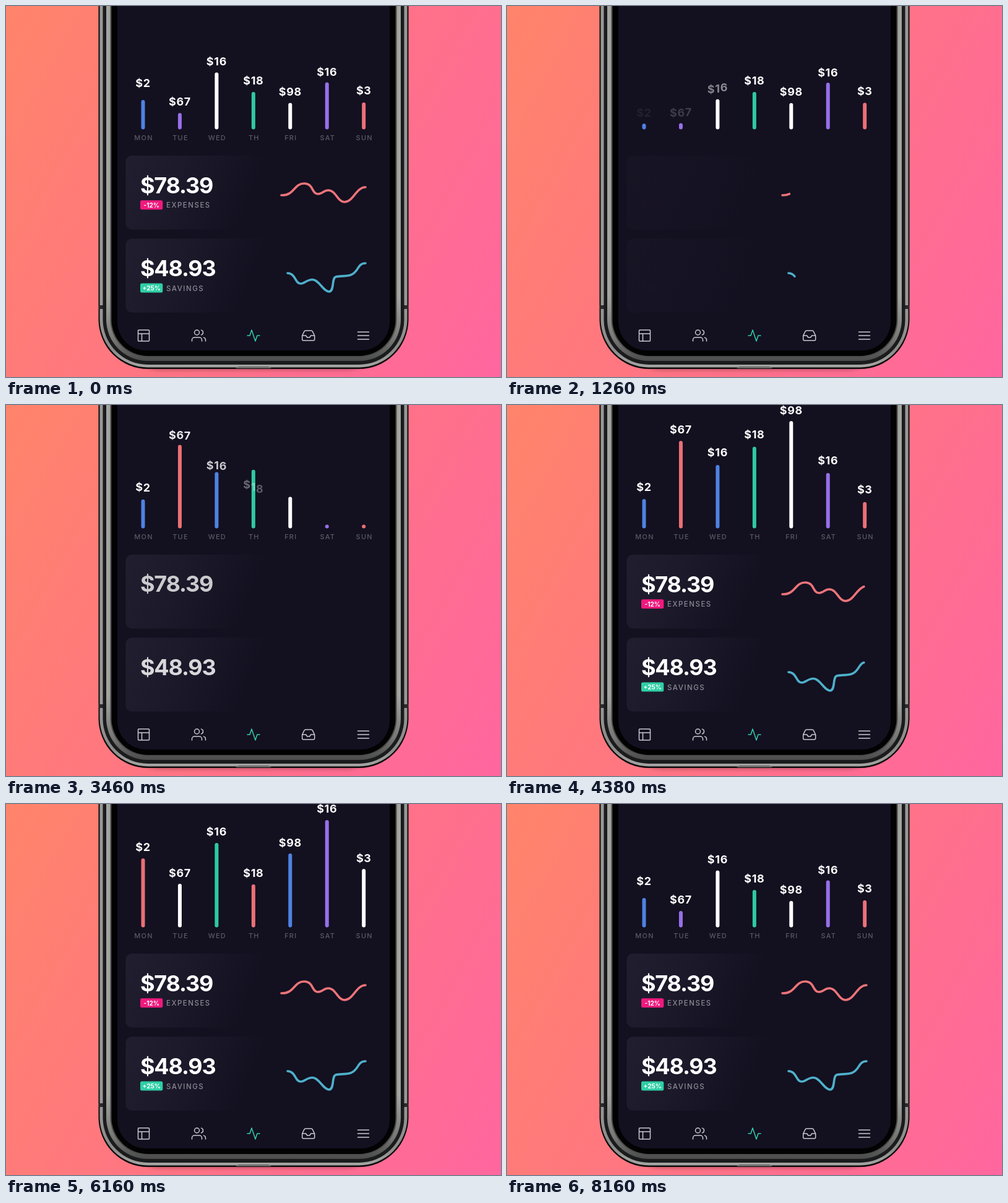
Animation of 800 by 600 pixels, one loop 8180 ms. Source, as an HTML page:

```html
<!DOCTYPE html>
<html lang="en">
<head>
<meta charset="utf-8">
<title>Spending overview</title>
<style>
  html, body { margin: 0; width: 100%; height: 100%; overflow: hidden; }
  body { background: linear-gradient(118deg, #ff846a, #ff7288 58%, #ff669f); }
  svg { display: block; width: 100vw; height: 100vh; }
  text { font-family: Inter, "Open Sans", sans-serif; }
  .amount { font-size: 18px; font-weight: 700; letter-spacing: .6px; fill: #fff; text-anchor: middle; }
  .day { font-size: 11px; font-weight: 500; letter-spacing: 1.2px; fill: #5b5866; text-anchor: middle; }
  .total { font-size: 36px; font-weight: 700; letter-spacing: -1.2px; fill: #fff; }
  .badge { font-size: 10px; font-weight: 700; fill: #fff; text-anchor: middle; }
  .caption { font-size: 11.5px; font-weight: 500; letter-spacing: 1.5px; fill: #8b8994; }
  .bar { stroke-width: 6; stroke-linecap: round; }
  .trend { fill: none; stroke-width: 3.6; stroke-linecap: round; stroke-linejoin: round; }
  .icon { fill: none; stroke: #cbcad0; stroke-width: 1.5; stroke-linecap: round; stroke-linejoin: round; }
</style>
</head>
<body>
<svg id="stage" viewBox="0 0 800 600">
  <defs>
    <linearGradient id="rim" gradientUnits="userSpaceOnUse" x1="0" y1="480" x2="0" y2="586">
      <stop offset="0" stop-color="#989896"/><stop offset=".7" stop-color="#8a8a88"/><stop offset="1" stop-color="#a6a6a4"/>
    </linearGradient>
    <linearGradient id="bezel" gradientUnits="userSpaceOnUse" x1="0" y1="470" x2="0" y2="575">
      <stop offset="0" stop-color="#a3a3a0"/><stop offset=".65" stop-color="#777775"/><stop offset="1" stop-color="#4a4a4a"/>
    </linearGradient>
    <linearGradient id="card" x1="0" y1="0" x2="1" y2=".12">
      <stop offset="0" stop-color="#211e2f"/><stop offset=".25" stop-color="#1c192a"/><stop offset=".55" stop-color="#131020"/>
    </linearGradient>
    <filter id="soft" x="-10%" y="-10%" width="120%" height="120%"><feGaussianBlur stdDeviation="3"/></filter>
  </defs>

  <rect x="190" y="480" width="420" height="109" rx="60" opacity=".25" filter="url(#soft)"/>
  <rect x="149.5" y="-200" width="501" height="787" rx="80" fill="#0b0b0c"/>
  <rect x="151.5" y="-200" width="497" height="784.5" rx="78" fill="url(#rim)"/>
  <path d="M150 487h8M642 487h8" stroke="#2b2b2c" stroke-width="6"/>
  <path d="M371 586l5-3h48l5 3z" fill="#6d6d6c"/>
  <rect x="156.5" y="-200" width="487" height="780" rx="73" fill="#1a1b1c"/>
  <rect x="162" y="-200" width="476" height="774" rx="67" fill="url(#bezel)"/>
  <rect x="168.5" y="-200" width="463" height="768" rx="61" fill="#4b4b4b"/>
  <rect x="170.5" y="-200" width="459" height="766" rx="59" fill="#020203"/>
  <rect x="180" y="-200" width="440" height="757" rx="46" fill="#131020"/>

  <g id="cards"></g>
  <g id="chart"></g>

  <g class="icon">
    <path transform="translate(210.5 521)" d="M4 3h16a1 1 0 0 1 1 1v16a1 1 0 0 1-1 1H4a1 1 0 0 1-1-1V4a1 1 0 0 1 1-1zM3 9h18M9 21V9"/>
    <path transform="translate(299.5 521)" d="M17 21v-2a4 4 0 0 0-4-4H5a4 4 0 0 0-4 4v2M13 7a4 4 0 1 1-8 0a4 4 0 1 1 8 0M23 21v-2a4 4 0 0 0-3-3.87M16 3.13a4 4 0 0 1 0 7.75"/>
    <path transform="translate(388 521)" stroke="#2fcfaa" d="M22 12h-4l-3 9L9 3l-3 9H2"/>
    <path transform="translate(476.7 521)" d="M22 12h-6l-2 3h-4l-2-3H2M5.45 5.11L2 12v6a2 2 0 0 0 2 2h16a2 2 0 0 0 2-2v-6l-3.45-6.89A2 2 0 0 0 16.76 4H7.24a2 2 0 0 0-1.79 1.11z"/>
    <path transform="translate(565.5 521)" d="M3 12h18M3 6.3h18M3 18h18"/>
  </g>
</svg>
<script>
const LOOP = 8180, START = 2240, STAGGER = 105, BASE = 196.5;
const blue = [79, 130, 226], purple = [151, 112, 232], white = [255, 255, 255],
      green = [47, 201, 162], red = [235, 112, 118];

// Each look holds [bar top, amount centre, colour]: first, second and last arrangement.
const days = [
  { name: 'MON', amount: '$2',  looks: [[152, 132, blue],  [88, 69, red],     [152, 124.5, blue]] },
  { name: 'TUE', amount: '$67', looks: [[58, 39, red],     [129, 111, white], [173, 154.5, purple]] },
  { name: 'WED', amount: '$16', looks: [[97, 76.5, blue],  [63, 44, green],   [107.5, 89, white]] },
  { name: 'TH',  amount: '$18', looks: [[67.5, 47, green], [130, 111, red],   [139, 120, green]] },
  { name: 'FRI', amount: '$98', looks: [[26, 8, white],    [80, 62, blue],    [157, 138.5, white]] },
  { name: 'SAT', amount: '$16', looks: [[110, 89.5, purple], [26, 7.5, purple], [124, 107, purple]] },
  { name: 'SUN', amount: '$3',  looks: [[157, 136, red],   [105, 87.5, white], [156.5, 137.5, red]] }
];
const cards = [
  { y: 242, total: '$78.39', rate: '-12%', tint: '#f01a7e', caption: 'EXPENSES', stroke: '#ec7479', lead: 0,
    path: 'M445 306C466 307 465 287 482 287C497 287 494 304 504 304C511 304 513 298 521 298C533 298 536 317 547 317C561 317 566 293 581 293' },
  { y: 376.3, total: '$48.93', rate: '+25%', tint: '#2fcfa5', caption: 'SAVINGS', stroke: '#4fb0ca', lead: 35,
    path: 'M455 432C468 432 467 449 476 449C483 449 486 442.500 495 442.500C506 442.500 513 462 522 462C531 462 526 440 533 438C540 436 548 438 557 435C571 430 567 416 581 416' }
];

function add(parent, tag, attrs, content = '') {
  const node = document.createElementNS('http://www.w3.org/2000/svg', tag);
  set(node, attrs);
  node.textContent = content;
  return parent.appendChild(node);
}
function set(node, attrs) {
  for (const key in attrs) node.setAttribute(key, attrs[key]);
}
const mix = (a, b, p) => a + (b - a) * p;
const mixColor = (a, b, p) => a.map((v, i) => mix(v, b[i], p));
const rgb = c => `rgb(${c.map(Math.round)})`;

function expoOut(time, start, duration = 800) {
  const x = (time - start) / duration;
  return x <= 0 ? 0 : x >= 1 ? 1 : 1 - 2 ** (-10 * x);
}
// Visible amount of something that enters at one time and leaves in the next pass.
const presence = (time, enter, leave, enterFor, leaveFor) =>
  expoOut(time, enter, enterFor) * (1 - expoOut(time, LOOP + leave, leaveFor));

const chart = document.getElementById('chart');
days.forEach((day, i) => {
  const x = 221.5 + i * 59.45;
  day.bar = add(chart, 'line', { class: 'bar', x1: x, x2: x, y2: BASE });
  day.label = add(chart, 'text', { class: 'day', x: x + 1, y: 216.5 }, day.name);
  day.text = add(chart, 'text', { class: 'amount', x });
  day.chars = [...day.amount].map(c => add(day.text, 'tspan', {}, c));
});

const cardLayer = document.getElementById('cards');
for (const card of cards) {
  const { y } = card;
  card.panel = add(cardLayer, 'rect', { x: 193.5, y, width: 413, height: 119.5, rx: 10, fill: 'url(#card)' });
  card.number = add(cardLayer, 'text', { class: 'total', x: 217, y: y + 61 }, card.total);
  card.note = add(cardLayer, 'g', {});
  add(card.note, 'rect', { x: 217, y: y + 72.3, width: 36.3, height: 15, rx: 2.5, fill: card.tint });
  add(card.note, 'text', { class: 'badge', x: 235.2, y: y + 83.5 }, card.rate);
  add(card.note, 'text', { class: 'caption', x: 259, y: y + 84.3 }, card.caption);
  card.trend = add(cardLayer, 'path', { class: 'trend', d: card.path, stroke: card.stroke, pathLength: 1 });
}

function drawDay(day, i, time) {
  const delay = i * STAGGER, [first, second, last] = day.looks;
  const toSecond = expoOut(time, 4805 + delay), toLast = expoOut(time, 7025 + delay);
  const blend = k => mix(mix(first[k], second[k], toSecond), last[k], toLast);
  const color = mixColor(mixColor(first[2], second[2], toSecond), last[2], toLast);
  const grow = presence(time, 3005 + delay, 970 + delay);
  set(day.bar, { y1: BASE - (BASE - 3 - blend(0)) * grow - .01, stroke: rgb(color) });
  set(day.label, { opacity: presence(time, 2990, 640, 500, 300) });

  let previous = 0;
  day.chars.forEach((char, k) => {
    const shown = presence(time, 3103 + delay + k * 4, 970 + delay + k * 4, 650, 750);
    const y = mix(176, blend(1), shown) + 6.5;
    set(char, { dy: y - previous, 'fill-opacity': shown });
    previous = y;
  });
}

function drawCard(card, time) {
  const { lead } = card;
  const number = presence(time, 3290 - lead, 360 - lead);
  const note = presence(time, 3600, 650, 700, 700);
  const drawn = presence(time, 3850, 800, 1000, 1200);
  set(card.panel, { opacity: mix(.3, 1, presence(time, 2995, 340, 600)) });
  set(card.number, { opacity: number, transform: `translate(0 ${-4 * (1 - number)})` });
  set(card.note, { opacity: note });
  set(card.trend, { 'stroke-dasharray': `${drawn} 2`, visibility: drawn > .002 ? 'visible' : 'hidden' });
}

function frame() {
  const now = performance.now() % LOOP;
  const time = now < START ? now + LOOP : now;
  days.forEach((day, i) => drawDay(day, i, time));
  cards.forEach(card => drawCard(card, time));
  requestAnimationFrame(frame);
}
frame();
</script>
</body>
</html>
```
